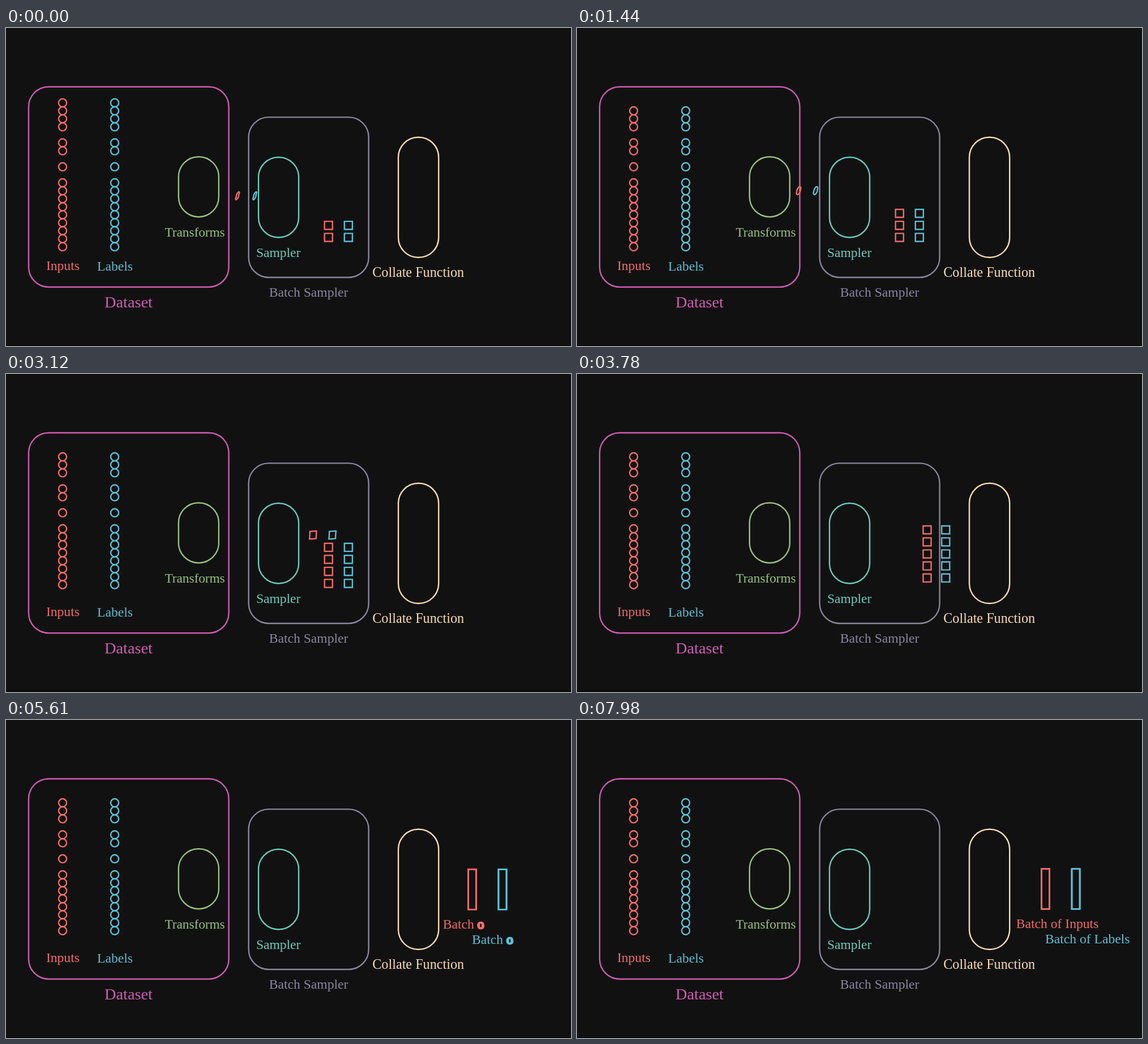
Write an HTML page that moves like this. It is 998 px wide and 561 px high and loops after 8 s.

```html
<!DOCTYPE html>
<html lang="en">
<head>
<meta charset="utf-8">
<title>Data loading pipeline</title>
<style>
  html, body { margin: 0; width: 100%; height: 100%; overflow: hidden; background: #111; }
  svg { display: block; width: 100%; height: 100%; }
  rect, circle, path { fill: none; stroke: currentColor; stroke-width: 2.4; }
  text { fill: currentColor; font: 23.6px "Liberation Serif", "Times New Roman", serif; white-space: pre; }
  .pen { stroke: currentColor; stroke-width: 3; }
  .input { color: #f16c66; }
  .label { color: #5dbfd6; }
  .dataset { color: #d05cb5; }
  .transforms { color: #97c47c; }
  .sampler { color: #68cdbd; }
  .batch { color: #8b85a0; }
  .collate { color: #fbdcae; }
  .edge { fill: #000; stroke: none; }
</style>
</head>
<body>
<svg id="stage" viewBox="0 0 998 561" preserveAspectRatio="none"></svg>
<script>
const LOOP = 8000;
const UNIT = 70.5;
const HALF = UNIT / 10;
const CLASSES = ['input', 'label'];
const COLUMN_X = [100, 192];
const TRANSFORM_X = [326, 354.2];
const SLOT_X = [569.7, 604.8];
const COLLATE_X = [714, 742.2];
const BATCH_X = [823.5, 877];
const ROWS = 19;
const STEPS = 64;

// Row taken from the columns, start of the trip to the transforms, start of the trip to the batch
const picks = [
  { row: 4, fetch: -4000, load: -3300 },
  { row: 7, fetch: -2600, load: -1900 },
  { row: 9, fetch: -1100, load: -312 },
  { row: 0, fetch: 401, load: 1152 },
  { row: 18, fetch: 1865, load: 2616 }
];
const FETCH_TIME = 660, LOAD_TIME = 720;
const COLLATE_START = 3395, COLLATE_TIME = 890;
const MERGE_START = 4280, MERGE_TIME = 920;
const WRITE_START = 5290, LETTER_TIME = 55;
const DRIFT_START = 7800, DRIFT_TIME = 900;

const stage = document.getElementById('stage');

function add(tag, attrs, text, parent = stage) {
  const el = document.createElementNS('http://www.w3.org/2000/svg', tag);
  for (const name in attrs) el.setAttribute(name, attrs[name]);
  if (text) el.textContent = text;
  parent.appendChild(el);
  return el;
}

function box(cls, x, y, width, height) {
  add('rect', { class: cls, x, y, width, height, rx: UNIT / 2 });
}

function caption(cls, text, x, y, size) {
  add('text', { class: cls, x, y, 'text-anchor': 'middle', style: `font-size:${size}px` }, text);
}

const rowY = row => 132 + row * 14.1;
const lerp = (a, b, k) => a + (b - a) * k;
const sigmoid = x => 1 / (1 + Math.exp(-x));

function smooth(t, start, duration) {
  const p = Math.min(1, Math.max(0, (t - start) / duration));
  const tail = sigmoid(-5);
  return (sigmoid(10 * (p - 0.5)) - tail) / (1 - 2 * tail);
}

box('dataset', 40, 103.7, 353.5, 353.3);
box('batch', 428.6, 157.4, 212, 282.6);
box('transforms', 304.8, 227.2, 71, 106);
box('sampler', 446, 228, 71, 141.5);
box('collate', 693, 192.8, 71.2, 212);

caption('input', 'Inputs', 100.4, 427, 23.6);
caption('label', 'Labels', 192.5, 427.5, 23.6);
caption('dataset', 'Dataset', 216.5, 493.3, 28.3);
caption('transforms', 'Transforms', 333.5, 367.5, 23.2);
caption('sampler', 'Sampler', 481.2, 403.5, 23.5);
caption('batch', 'Batch Sampler', 534.6, 474, 23.6);
caption('collate', 'Collate Function', 728.2, 438.7, 24.2);

CLASSES.forEach((cls, c) => {
  for (let row = 0; row < ROWS; row++) {
    if (picks.some(p => p.row === row)) continue;
    add('circle', { class: cls, cx: COLUMN_X[c], cy: rowY(row), r: HALF });
  }
});

const items = picks.flatMap((pick, slot) =>
  CLASSES.map((cls, c) => ({ pick, slot, c, el: add('path', { class: cls }) })));

const notes = ['Batch of Inputs', 'Batch of Labels'].map((text, c) => {
  const el = add('text', { class: CLASSES[c] });
  return {
    el, text, x: [771.8, 823][c], y: [368.3, 395][c],
    done: add('tspan', {}, '', el),
    pen: add('tspan', { class: 'pen' }, '', el)
  };
});

add('rect', { class: 'edge', x: 0, y: 560, width: 998, height: 1 });

// Point on a unit square, clockwise from the upper left corner
function squarePoint(u) {
  const side = Math.floor(u * 4), s = (u * 4 - side) * 2 - 1;
  return [[s, -1], [1, s], [-s, 1], [-1, -s]][side];
}

// Circle (counterclockwise) turning into a square (clockwise)
function outline(x, y, halfW, halfH, morph) {
  const points = [];
  for (let i = 0; i < STEPS; i++) {
    const angle = i / STEPS * 2 * Math.PI;
    const [sx, sy] = squarePoint(i / STEPS);
    const px = x + halfW * lerp(Math.cos(angle), sx, morph);
    const py = y + halfH * lerp(-Math.sin(angle), sy, morph);
    points.push(px.toFixed(2) + ' ' + py.toFixed(2));
  }
  return 'M' + points.join('L') + 'Z';
}

function drawItem({ pick, slot, c, el }, t, dx, dy) {
  const fetched = smooth(t, pick.fetch, FETCH_TIME);
  const loaded = smooth(t, pick.load, LOAD_TIME);
  const collated = smooth(t, COLLATE_START, COLLATE_TIME);
  const merged = smooth(t, MERGE_START, MERGE_TIME);
  const path = (from, ...stops) =>
    stops.reduce((at, [to, k]) => lerp(at, to, k), from);
  const x = path(COLUMN_X[c], [TRANSFORM_X[c], fetched], [SLOT_X[c], loaded],
    [COLLATE_X[c], collated], [BATCH_X[c], merged]);
  const y = path(rowY(pick.row), [280, fetched], [369.4 - 21.2 * slot, loaded],
    [298.6 + 21.2 * (2 - slot), collated], [298.9, merged]);
  const halfH = lerp(HALF, UNIT / 2, merged);
  el.setAttribute('d', outline(x + dx, y + dy, HALF, halfH, loaded));
}

function drawNote(note, t, dx, dy) {
  const progress = (t - WRITE_START) / LETTER_TIME;
  let count = Math.max(0, Math.floor(progress));
  let end = 0;
  // Spaces take no writing time
  for (; end < note.text.length && count > 0; end++) {
    if (note.text[end] !== ' ') count--;
  }
  const rest = note.text.slice(end);
  const next = progress < 0 ? '' : rest.slice(0, rest.search(/\S/) + 1);
  note.done.textContent = note.text.slice(0, end);
  note.pen.textContent = next;
  note.el.setAttribute('x', note.x + dx);
  note.el.setAttribute('y', note.y + dy);
}

function draw() {
  const t = performance.now() % LOOP;
  const drift = smooth(t, DRIFT_START, DRIFT_TIME);
  const dx = 97 * drift, dy = -22 * drift;
  items.forEach(item => drawItem(item, t, dx, dy));
  notes.forEach(note => drawNote(note, t, dx, dy));
  requestAnimationFrame(draw);
}
draw();
</script>
</body>
</html>
```
